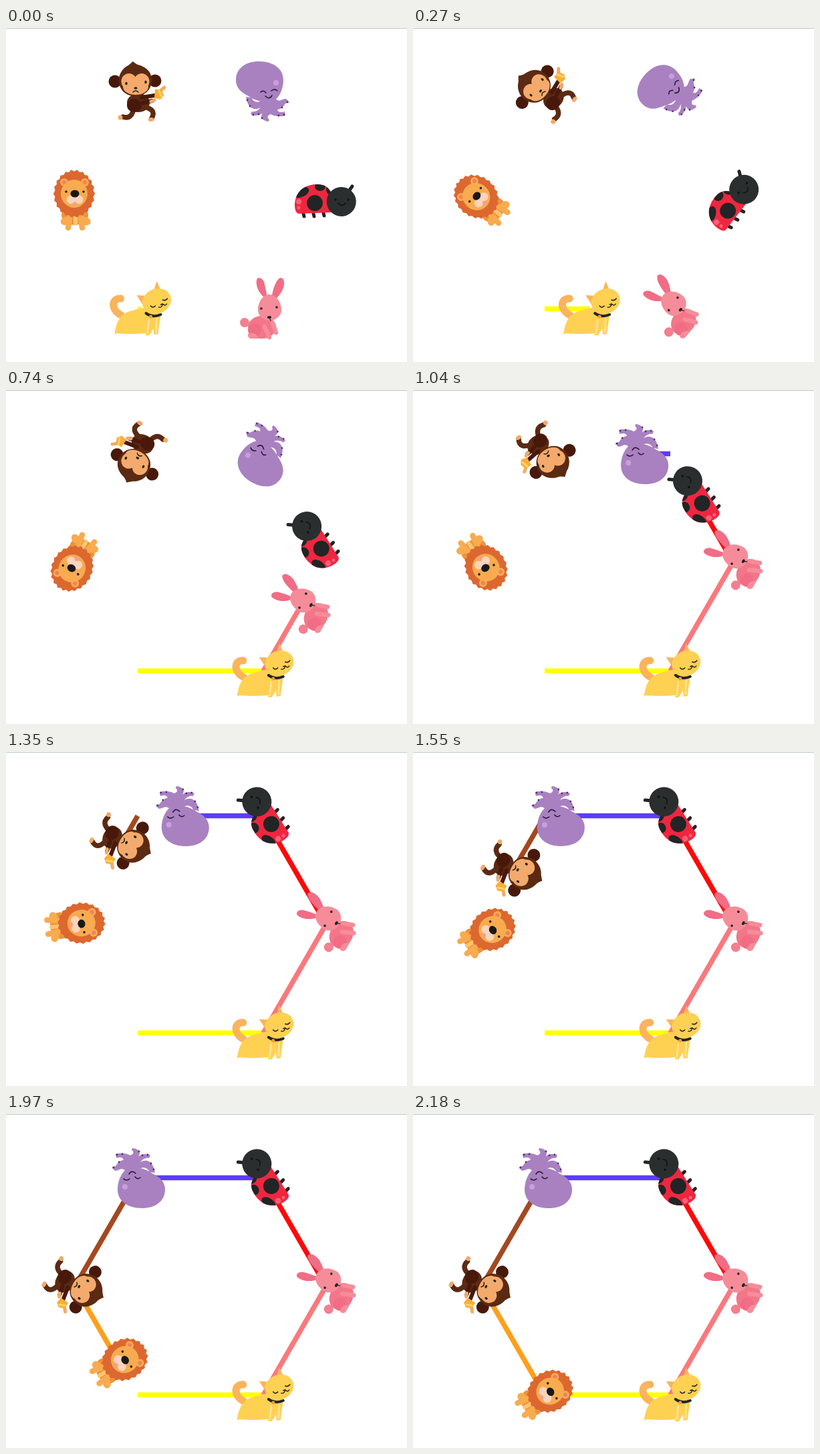
Animation, 600 px wide and 500 px high, one loop 6420 ms. Source, as an HTML page:

```html
<!DOCTYPE html>
<html lang="en">
<head>
<meta charset="utf-8">
<title>Animal hexagon</title>
<style>
html, body { margin: 0; width: 100%; height: 100%; overflow: hidden; background: #fff; }
svg { display: block; width: 100%; height: 100%; }
</style>
</head>
<body>
<svg id="stage" viewBox="0 0 600 500"></svg>
<script>
const LOOP = 6420, SIDE = 188, STEPS = 24, TURN = 6.25;
const INK = '#222425';

const oval = (x, y, rx, ry, fill, tilt = 0) =>
  `<ellipse cx="${x}" cy="${y}" rx="${rx}" ry="${ry}" fill="${fill}" transform="rotate(${tilt} ${x} ${y})"/>`;
const dot = (x, y, r, fill = INK) => oval(x, y, r, r, fill);
const area = (d, fill) => `<path d="${d}" fill="${fill}"/>`;
const line = (d, color = INK, w = 1.5) =>
  `<path d="${d}" fill="none" stroke="${color}" stroke-width="${w}" stroke-linecap="round" stroke-linejoin="round"/>`;

function cat() {
  const fur = '#ffd152', tan = '#fbb35c';
  return '<g transform="translate(-5.2 0)">' +
    line('M172 405C159 404 156 421 173 430', tan, 11) +
    area('M163 459C165 440 172 426 190 423C200 420 207 417 214 421L232 428C231 438 229 448 228 458L222 459L221 450L215 460L209 460L210 457Q186 459 166 457Z', fur) +
    line('M214 437L212 457M226 435L225 455', '#ffe3a0', 2.5) +
    area('M196 400L213 401L205 414Z', tan) +
    area('M221 395L226 379L233 395Z', tan) +
    oval(226, 409, 22, 18.5, fur, -22) +
    line('M210 427C217 432 225 432 232 429', INK, 4) +
    dot(217, 432, 2.5, '#f49a35') +
    line('M217 416Q220 420 224 416M235 407Q239 409 242 405', INK, 1.6) +
    line('M232 414L235 413M235 413Q234 419 229 418M235 413Q239 417 241 413', INK, 1.4) +
    '</g>';
}

function rabbit() {
  const fur = '#f68c99', deep = '#f06d85';
  return dot(357, 441, 7, '#f47f90') +
    area('M389 405C380 400 373 387 375 377C376 372 383 373 386 380C388 388 390 397 391 405Z', deep) +
    area('M397 405C399 393 403 378 410 374C417 373 417 383 415 389C412 397 406 403 402 408Z', deep) +
    oval(383, 448, 21, 17, '#f37689') +
    oval(372, 452, 10, 10, deep) +
    area('M362 458Q373 453 378 465L366 465Q361 463 362 458Z', fur) +
    line('M387 447L394 463M399 442L404 456', fur, 6.5) +
    area('M393 399C404 398 413 411 412 424C410 434 401 438 394 438C384 437 376 430 377 420C378 409 384 400 393 399Z', fur) +
    dot(382, 420, 1.8) + dot(405, 418, 1.8) +
    oval(394, 433, 3, 2, INK) + line('M394 434L396 438', INK, 1.2);
}

function ladybug() {
  const shell = 'M438 278C433 277 432 270 432 264C433 245 446 234 466 234C486 234 492 251 488 276Z';
  return line('M445 278L446 282M460 278L461 282M475 277L476 281', INK, 5) +
    line('M513 244L518 237', INK, 5) +
    `<clipPath id="shell"><path d="${shell}"/></clipPath>` + area(shell, '#f0263f') +
    '<g clip-path="url(#shell)">' +
    oval(442, 246, 12, 7, INK, -25) + oval(470, 237, 8, 7, INK) +
    oval(486, 242, 7, 8, INK) + dot(462, 262, 12) +
    dot(438, 260, 4, '#fb6079') + dot(438, 269, 2.5, '#fb6079') + '</g>' +
    dot(501.8, 260, 22, '#2b2e2f') +
    dot(493, 257, 1.8, '#111') + dot(512, 257, 1.8, '#111') +
    line('M497 262Q503 269 508 262', '#111', 1.5);
}

function octopus() {
  const skin = '#a981c0', spot = '#513078';
  return area('M386 106C378 113 371 112 367 104L359 103C361 112 363 119 371 121C375 122 379 120 381 119C378 123 373 126 368 125L366 129C373 133 381 130 384 127C379 134 384 139 393 140L394 137C390 134 391 131 396 129C403 133 412 133 418 131L417 125C410 127 407 126 406 122C412 122 416 116 418 113L424 111L419 106C412 106 410 112 403 106Z', skin) +
    area('M344 78C344 60 359 50 379 50C400 50 416 61 415 80C414 92 410 103 400 110C387 113 373 109 363 102C351 96 344 89 344 78Z', skin) +
    [[361, 108], [365, 117], [421, 111], [413, 119], [370, 130], [378, 129], [383, 135], [408, 131], [416, 130]]
      .map(([x, y]) => dot(x, y, 1.4, spot)).join('') +
    dot(404, 82, 4, '#c99fdb') +
    line('M381 96Q385 92 389 97M397 94Q402 90 406 94M388 102Q394 108 398 101', '#2a1738', 1.6);
}

function monkey() {
  const fur = '#5b2a12', dark = '#48190b', skin = '#f3aa6c';
  return line('M191 119C190 131 184 136 175 133', fur, 7.5) +
    line('M206 118C217 120 224 125 218 135', fur, 7.5) +
    dot(171, 134, 3.5, skin) + oval(217, 137, 4.5, 3, skin) +
    oval(198, 112, 17, 14, fur) + oval(192, 116, 11, 10, dark) +
    line('M203 104L222 101M205 112L219 109', dark, 6) +
    line('M222 108L217 110M232 93L237 89', skin, 5) +
    area('M223 92L233 92L236 101L231 107L222 105Z', '#fbae35') +
    line('M229 94L232 102', '#ffd569', 3) +
    dot(163, 80, 9.5, dark) + dot(223, 79, 9.5, dark) +
    area('M190 50Q195 55 201 56C212 60 219 68 218 80C217 94 206 102 194 102C180 102 170 94 169 80C168 68 176 59 183 56Z', fur) +
    oval(184, 80, 11.5, 12, skin) + oval(203, 80, 11.5, 12, skin) + oval(194, 88, 19, 12, skin) +
    oval(180, 83, 1.7, 2.3, INK) + oval(209, 81, 1.7, 2.3, INK) +
    oval(194, 90, 2.5, 1.7, INK) + line('M190 96Q194 92 198 96', INK, 1.5);
}

function lion() {
  const mane = Array.from({ length: 44 }, (_, i) => {
    const a = i * Math.PI / 22, r = i % 2 ? 30 : 32.5;
    return `${(102 + r * Math.cos(a) * .96).toFixed(1)} ${(248 + r * Math.sin(a) * 1.11).toFixed(1)}`;
  }).join('L');
  const fur = '#f8ab4f', dark = '#ed9437', pale = '#fcd3bd';
  return oval(103, 280, 20, 15, dark) +
    oval(89, 289, 7.5, 6, fur, -20) + oval(119, 289, 8, 6, fur, 20) +
    line('M96 277L93 299M111 277L114 299', fur, 8.5) + line('M104 284L104 293', '#ffc570', 6) +
    area(`M${mane}Z`, '#dc6830') +
    dot(87, 231, 6, fur) + dot(118, 231, 6, fur) +
    dot(87, 231, 3, '#ef8063') + dot(118, 231, 3, '#ef8063') +
    oval(102, 248, 20, 21, fur) +
    dot(97, 257, 6.5, pale) + dot(109, 257, 6.5, pale) + oval(103, 264, 3.5, 3, '#f3a183') +
    oval(103, 248, 6.5, 5.5, '#181818') + dot(90, 245, 1.8) + dot(116, 245, 1.8);
}

// Each animal turns 60 degrees further than the previous one, then walks one side.
const walkers = [
  { x: 197, y: 420.5, start: -.6, pen: '#ffff00', art: cat },
  { x: 385, y: 420.5, start: 9.7, pen: '#fb787c', art: rabbit },
  { x: 479, y: 258, start: 19.1, pen: '#ff0808', art: ladybug },
  { x: 385, y: 95.5, start: 28.4, pen: '#5b3dfa', art: octopus },
  { x: 197, y: 95.5, start: 38.1, pen: '#a4481f', art: monkey },
  { x: 103, y: 258, start: 48, pen: '#ff9f1a', art: lion }
];

const stage = document.getElementById('stage');
stage.innerHTML = '<rect width="600" height="500" fill="#fff"/><rect width="600" height="1" fill="#bcc8c7"/>' +
  walkers.map(w => `<path class="trail" fill="none" stroke="${w.pen}" stroke-width="7.5"/>`).join('') +
  walkers.map(w => `<g class="walker">${w.art()}</g>`).join('');
const trails = stage.querySelectorAll('.trail');
const sprites = stage.querySelectorAll('.walker');

// Slightly uneven tick rate: [time in ms, tick].
const clock = [[0, 0], [50, 1], [490, 15], [740, 24], [1040, 34], [1350, 44], [1760, 58], [2180, 72]];

function tickAt(t) {
  const i = clock.findIndex(c => c[0] > t);
  if (i < 0) return 72;
  const [t0, k0] = clock[i - 1], [t1, k1] = clock[i];
  return Math.floor(k0 + (k1 - k0) * (t - t0) / (t1 - t0) + 1e-6);
}

function render(t) {
  const tick = tickAt(t);
  walkers.forEach((w, i) => {
    const heading = i * Math.PI / 3;
    const dist = SIDE * Math.min(1, Math.max(0, (tick - w.start) / STEPS));
    const dx = dist * Math.cos(heading), dy = -dist * Math.sin(heading);
    const angle = Math.min(60 * i, TURN * tick);
    trails[i].setAttribute('d', dist ? `M${w.x} ${w.y}l${dx} ${dy}` : '');
    sprites[i].setAttribute('transform', `translate(${dx} ${dy}) rotate(${-angle} ${w.x} ${w.y})`);
  });
}

const began = performance.now();
function loop() {
  render((performance.now() - began) % LOOP);
  requestAnimationFrame(loop);
}
loop();
</script>
</body>
</html>
```
